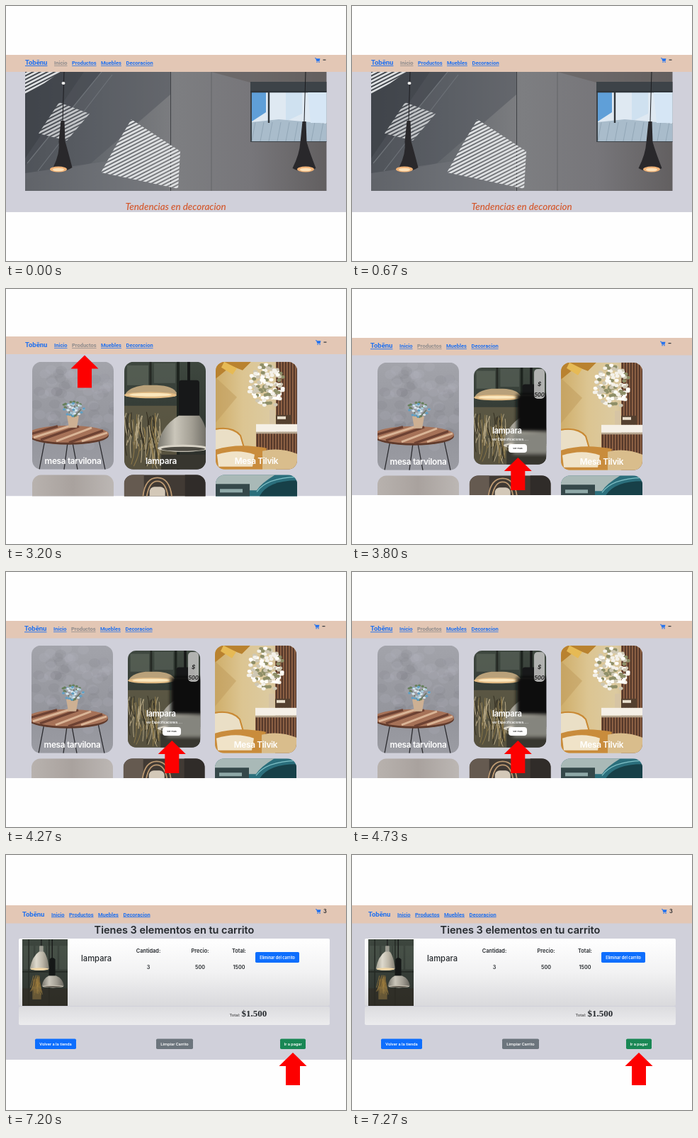
Write an HTML page that moves like this. It is 480x360 px and loops after 8 s.

```html
<!DOCTYPE html>
<html lang="es">
<head>
<meta charset="utf-8">
<title>Tienda</title>
<style>
html, body { margin: 0; width: 100%; height: 100%; overflow: hidden; background: #fefefe; }
svg { display: block; }
text { white-space: pre; }
.nav { font: 700 7.5px Roboto, sans-serif; fill: #1f70f0; text-decoration: underline; }
.ui { font-family: Inter, sans-serif; }
.rob { font-family: Roboto, sans-serif; }
.mono { font-family: "Liberation Mono", monospace; }
.title { font: 600 11.8px Inter, sans-serif; letter-spacing: -.3px; }
</style>
</head>
<body>
<script>
let seed = 7;
const rand = () => (seed = seed * 16807 % 2147483647) / 2147483647;
const range = (n, f) => Array.from({ length: n }, (_, i) => f(i)).join('');

const rect = (x, y, w, h, fill, more = '') =>
  `<rect x="${x}" y="${y}" width="${w}" height="${h}" fill="${fill}" ${more}/>`;
const path = (d, fill, more = '') => `<path d="${d}" fill="${fill}" ${more}/>`;
const line = (d, stroke, w = 1, more = '') => path(d, 'none', `stroke="${stroke}" stroke-width="${w}" ${more}`);
const oval = (x, y, rx, ry, fill, more = '') =>
  `<ellipse cx="${x}" cy="${y}" rx="${rx}" ry="${ry}" fill="${fill}" ${more}/>`;
const text = (x, y, s, size, fill, more = '', cls = 'ui') =>
  `<text x="${x}" y="${y}" font-size="${size}" fill="${fill}" class="${cls}" ${more}>${s}</text>`;
const mid = 'text-anchor="middle"';
const bold = 'font-weight="600"';
const at = (x, y, body, more = '') => `<g transform="translate(${x} ${y}) ${more}">${body}</g>`;
const grad = (id, dir, ...stops) => `<linearGradient id="${id}" ${dir === 'v' ? 'x2="0" y2="1"' : ''}>` +
  stops.map((c, i) => `<stop offset="${i / (stops.length - 1)}" stop-color="${c}"/>`).join('') + '</linearGradient>';
const blobs = (n, x, y, w, h, r, colors) => range(n, i => {
  const a = rand() * 6.283, d = Math.sqrt(rand());
  return oval(x + Math.cos(a) * d * w, y + Math.sin(a) * d * h, r, r * .8, colors[i % colors.length]);
});

const arrow = (x, y) => path(`M${x} ${y}l19.5 19h-9.5v27h-20v-27h-9.5z`, '#fd0000');

const cart = (x, y) => at(x, y,
  line('M0 .7h1.5l1.2 4h4', '#1f70f0', .9) + path('M1.8 1.2h5.7l-.9 3.1h-4z', '#1f70f0') +
  oval(3.1, 6.2, .8, .8, '#1f70f0') + oval(6, 6.2, .8, .8, '#1f70f0'));

const links = [['Inicio', 41], ['Productos', 66], ['Muebles', 107], ['Decoracion', 142.5]];

// Page background, top bar and links
function page({ top, bar, bottom, x, y, active, cartX, cartY, plain, count }, body) {
  return `<svg width="480" height="${bottom}">` +
    rect(0, top, 480, bottom - top, '#d0d0da') + rect(0, top, 480, bar - top, '#e3c7b5') +
    `<text x="${x}" y="${y}" class="nav" style="font-size:9.5px${plain ? ';text-decoration:none' : ''}">Tobēnu</text>` +
    links.map(([s, dx]) => `<text x="${x + dx}" y="${y}" class="nav" ${s === active ? 'style="fill:#8e8b8c"' : ''}>${s}</text>`).join('') +
    cart(cartX, cartY) +
    (count ? text(cartX + 11, cartY + 6, count, 7.5, '#212529', bold) : rect(cartX + 11.5, cartY + 2.5, 4, 1.2, '#34383c')) +
    body + '</svg>';
}

const hangLamp = (x, top, neck, half) =>
  line(`M${x + 2} 93L${x} ${top}`, '#1c1c1f', 1) +
  path(`M${x - 2.5} ${top}h5l1 29q4 14 ${half - 4} 37q-${half} 9-${half * 2 - 1} 0q10-20 ${half - 6}-37z`, '#29282b') +
  oval(x + neck, 230.5, 12, 4, '#f0b277') + oval(x + neck, 231, 8, 2.3, '#fbe0b8');

const hero = `<svg x="27" y="93" width="425.5" height="168" viewBox="27 93 425.5 168">` +
  rect(27, 93, 426, 168, 'url(#wall)') +
  path('M27 93H135L27 225z', '#3c4147', 'opacity=".75"') +
  path('M110 93H232V125L120 222L27 245V215z', '#52575d', 'opacity=".55"') +
  path('M27 236L150 218L232 261H27z', '#74777d', 'opacity=".5"') +
  path('M290 93H452V140L345 108z', '#64605e', 'opacity=".6"') +
  line('M135 93L30 222M150 97L45 233', '#6d7278', 1.2) +
  line('M232.5 93V261', '#3f4145', 1) + line('M290 93V261', '#5b5c60', .7) +
  path('M27 93H77L54 109L27 124z', 'url(#slats)') +
  path('M75 136L118 152L86 190L46 180z', 'url(#slats)', 'opacity=".8"') +
  path('M177 160L246 205L243 258L134 235L158 192z', 'url(#slats)') +
  rect(345, 107, 108, 85, '#3d4348') + rect(347, 121, 106, 70, '#dfe9f2') +
  path('M347 122H367V150L347 163z', '#5f9fd8') +
  path('M395 122H418V152L395 163z', '#cfe1f0') +
  path('M347 164L385 160L453 166V191H347z', '#a9bccb') +
  range(9, i => line(`M${352 + i * 12} 164l-5 27`, '#8197a8', .6)) +
  line('M371 120V165M345 121H453', '#30363b', 2.4) +
  path('M426 122H453V165H430z', '#d6e6f5') +
  hangLamp(80, 162, -6, 14) + hangLamp(421, 163, 2, 17) +
  oval(81, 109, 2.5, 2, '#f0f0ef') + '</svg>';

// Pictures of the product cards, each 115 x 152
const table = rect(0, 0, 115, 152, 'url(#concrete)') +
  blobs(70, 57, 62, 62, 62, 8, ['#b9bbc228', '#70747c20']) +
  line('M18 110L10 152M94 110L103 152M50 114L45 152M57 114L64 152', '#2b2b2f', 1.3) +
  oval(51, 104, 57, 13, '#5f3a2b') + oval(51, 102, 57, 12, '#a67258') +
  line('M-2 102L36 91M12 110L66 91M52 114L100 97', '#6d4233', 3.5) +
  line('M2 107L52 91M34 112L84 93M70 112L106 100', '#d9b496', 3) +
  path('M49 76H66L63 93H52z', '#cdb093') +
  line('M57 78L48 64M58 78L60 62M59 78L69 67', '#5e7156', 1.2) +
  blobs(40, 57, 67, 16, 11, 2, ['#d9e6ec', '#5f9fc4', '#66805b', '#a9c8d8']);

const lampCard = rect(0, 0, 115, 152, 'url(#dusk)') +
  rect(4, 5, 30, 28, '#667063', 'opacity=".55"') + rect(42, 2, 30, 28, '#5d675d', 'opacity=".55"') +
  rect(0, 62, 76, 90, '#6a6149', 'opacity=".7"') +
  line('M37 0V34', '#252924', 3) + line('M76 0V152', '#1e241f', 4) +
  path('M1 47Q5 36 28 33H46Q69 34 74 44L72 49H3z', '#b9a17a') +
  oval(37, 47, 37, 4.5, '#e4bd86') + oval(37, 46.5, 30, 2.4, '#fbe7bd') +
  range(60, () => { const x = rand() * 50, y = 70 + rand() * 50;
    return line(`M${x} ${y}q${rand() * 12 - 6} 12 ${rand() * 14 - 7} 32`, ['#b3a583', '#8b7749', '#332e21'][x * 9 % 3 | 0], 1.1); }) +
  rect(89, 0, 4, 30, '#171918') + rect(77, 26, 29, 56, '#171819', 'rx="4"') +
  path('M77 76H106Q118 92 120 122Q82 132 47 122Q50 92 77 76z', 'url(#enamel)') +
  oval(83, 122, 36, 5, '#d8d3c6') + oval(83, 123, 31, 3, '#4d4b43') + rect(52, 131, 63, 21, '#37362f');

const dressing = rect(0, 0, 115, 152, 'url(#cream)') +
  path('M0 0H50L38 12L22 6L0 24z', '#b9822f') + path('M12 0L30 9L24 18L8 8z', '#e6ba55') +
  path('M0 22L30 50L0 86z', '#bf9c5c', 'opacity=".5"') +
  rect(85, 0, 30, 152, '#8a5f43') + rect(57, 100, 58, 32, '#8a5f43') +
  range(15, i => rect(58 + i * 4, i < 7 ? 100 : 0, 1.6, i < 7 ? 32 : 132, '#4a3025')) +
  rect(76, 68, 8, 20, '#d6c4a4') + rect(85, 75, 22, 13, '#54402f') + rect(87, 77, 12, 4, '#e9dfcd') +
  blobs(130, 72, 35, 25, 32, 3, ['#f4f1e9', '#cfc8b4', '#fffdf8', '#8f8f68']) +
  rect(57, 88, 58, 11, '#f5f0e7') + rect(57, 99, 58, 2.5, '#b4a48e') +
  path('M0 96Q20 92 34 104L41 127L0 136z', '#eadfc6') + line('M0 95Q24 91 35 104L42 128', '#c98833', 2) +
  path('M0 124Q32 114 72 122L66 152H0z', '#c98c3c') +
  path('M2 131Q30 122 55 131L52 148H4z', '#f0e3c8') + path('M66 126Q90 120 115 130V152H66z', '#d9bd8c');

const plain = rect(0, 0, 115, 152, 'url(#stone)');
const swing = rect(0, 0, 115, 152, '#413a34') + rect(0, 0, 28, 40, '#655a50') + rect(86, 0, 29, 40, '#302c29') +
  line('M26 40Q27 4 47 4Q67 4 68 40M31 40Q33 9 47 9Q61 9 63 40', '#bd9a72', 1.8) +
  rect(36, 17, 22, 20, '#d3c8b8', 'rx="7"');
const salon = rect(0, 0, 115, 152, '#2b6f7c') + path('M0 0H84Q64 12 58 22H0z', '#a9b9b7') +
  path('M0 13H48V40H0z', '#35484a') + rect(6, 20, 32, 5, '#8fa9a8') +
  path('M62 30Q74 8 115 8V40H62z', '#174048') + line('M58 24Q72 4 115 3', '#7fc0c6', 1.3);

const card = (x, y, picture, label, more = '', lx = 57.5) =>
  at(x, y, `<g clip-path="url(#card)">${picture}</g>` +
    (label ? text(lx, 144.7, label, 11.8, '#fff', mid, 'title') : ''), more);

const rows = (x, y) => card(x, y, table, 'mesa tarvilona') + card(x + 259, y, dressing, 'Mesa Tilvik') +
  card(x, y + 159.5, plain) + card(x + 129.7, y + 159.5, swing) + card(x + 259, y + 159.5, salon);

const hovered = card(172, 111, lampCard +
    rect(68, 42, 60, 58, '#0d0f10', 'filter="url(#soft)"') +
    rect(62, 102, 60, 34, '#85857e', 'filter="url(#soft)"'), '', 'scale(.89 .9)') +
  rect(257, 113, 15, 42, '#c6c6c4', 'rx="5" opacity=".85"') +
  text(264.5, 137, '$', 8, '#1b1b1b', mid + ' font-style="italic" font-weight="600"') +
  text(264.5, 151.5, '500', 7.6, '#1b1b1b', mid + ' font-style="italic" font-weight="600"') +
  text(198, 204, 'lampara', 11.2, '#fff', 'style="font-size:11.2px"', 'title') +
  text(198, 213.8, 'ver Especificaciones.....', 4.4, '#fff', bold) +
  rect(221, 219, 26, 12, '#fff', 'rx="4"') + text(234, 226.4, 'ver mas', 3.5, '#333', mid + ' ' + bold);

// Two enamel lamps, used on the detail page and in the cart
const lamps = rect(0, -20, 125, 220, 'url(#dusk)') +
  range(4, i => rect(3 + i * 33, 4, 28, 60, '#5d675c', 'opacity=".35"')) +
  line('M18-20V200M74-20V200M0 70H125', '#252a25', 3) + rect(0, 112, 125, 90, '#302a22', 'opacity=".6"') +
  range(44, () => { const x = 30 + rand() * 18, y = 78 + rand() * 22;
    return line(`M${x} ${y}q${rand() * 8 - 4} 14 ${rand() * 18 - 9} 30`, rand() > .5 ? '#b08c45' : '#715a30', 1); }) +
  rect(28, 108, 24, 32, '#8c7440', 'opacity=".6"') +
  rect(51, -20, 3, 36, '#242624') + rect(47, 4, 11, 18, '#9c9b91', 'rx="2"') +
  path('M46 19H59Q69 27 74 63Q46 71 21 62Q27 31 46 19z', 'url(#shade)') +
  oval(47.5, 63, 25, 3.3, '#f0d6a5') +
  rect(81, -20, 3, 60, '#1b1d1c') + path('M75 38Q82 30 91 38V80H74z', '#151817') +
  path('M73 80H93Q111 86 115 106Q84 114 54 106Q57 87 73 80z', 'url(#enamel)') +
  oval(84.5, 107, 29, 3, '#c8c2b4') + oval(84.5, 107.6, 25, 1.7, '#5c574d');

const pill = (y, s) => rect(312, y, 38, 15, '#95e1d3', 'rx="7.5" filter="url(#drop)"') +
  text(331, y + 9.5, s, 5, '#d9f5ef', mid);

const detail = text(240.5, 126, 'Detalle de Producto', 14.6, '#2b2f33', mid + ' ' + bold) +
  rect(116, 153.5, 249, 160, '#fff', 'rx="3" filter="url(#drop)"') +
  `<svg x="116" y="153.5" width="125" height="138">${lamps}</svg>` +
  text(255, 178, 'lampara', 9.4, '#2b2f33', bold) + text(255, 204.5, '$500', 9, '#2b2f33', bold) +
  ['LAMPARA RETRO EN METAL CON LUZ DE 220', 'W72 NEGRO'].map((s, i) =>
    text(303.5, 217.5 + i * 4.5, s, 4, '#6b6b6b', mid + ' font-style="italic"', 'mono')).join('') +
  text(270, 266, '3', 10, '#e94a30', mid + ' font-weight="700"') +
  pill(255, '+') + pill(274, '-') +
  rect(253, 274, 38, 15, '#b09468', 'rx="7.5" filter="url(#drop)"') +
  text(272, 283, 'Añadir al carrito', 3.6, '#fff', mid + ' font-style="italic" font-weight="600"');

const button = (x, y, w, h, fill, s, size, cls) =>
  rect(x, y, w, h, fill, 'rx="1.8"') +
  text(x + w / 2, y + h / 2 + 2, s, size, '#fff', mid + (cls ? ' font-weight="500"' : ' ' + bold), cls);

const basket = text(237.5, 111, 'Tienes 3 elementos en tu carrito', 14.5, '#25292d', mid + ' ' + bold) +
  rect(18, 118, 439, 95, 'url(#panel)', 'rx="2"') +
  rect(18, 214, 439, 26, 'url(#foot)', 'rx="2"') +
  `<svg x="23" y="119" width="64" height="94">${at(0, 7, lamps, 'scale(.512 .556)')}</svg>` +
  text(106, 150, 'lampara', 11.2, '#25292d', 'font-weight="500"') +
  [['Cantidad:', 3, 201], ['Precio:', 500, 274], ['Total:', 1500, 329]].map(([head, value, x]) =>
    text(x, 138, head, 7.4, '#25292d', mid + ' ' + bold) + text(x, 161, value, 7.2, '#25292d', mid + ' ' + bold)).join('') +
  button(352, 137, 62, 15, '#0d6efd', 'Eliminar del carrito', 5.5) +
  text(315.5, 227.5, 'Total:', 6, '#333', '', 'rob') +
  text(332.5, 227.5, '$1.500', 13, '#25292d', 'font-weight="700" style="font-family:Liberation Serif,serif"') +
  button(41, 259.5, 58, 14.5, '#0d6efd', 'Volver a la tienda', 5.9, 'rob') +
  button(212, 259.5, 52, 14.5, '#6c757d', 'Limpiar Carrito', 5.9, 'rob') +
  button(387, 259.5, 36, 14.5, '#198754', 'Ir a pagar', 5.9, 'rob');

const scenes = [
  [0, page({ top: 69, bar: 93, bottom: 291, x: 27, y: 83, active: 'Inicio', cartX: 436, cartY: 73 },
    hero + text(239.5, 287.5, 'Tendencias en decoracion', 13.4, '#d4562a',
      mid + ' font-style="italic" font-weight="500" style="font-family:Lato,sans-serif"'))],
  [1800, page({ top: 67, bar: 92, bottom: 292.5, x: 27, y: 82, active: 'Productos', cartX: 437, cartY: 72, plain: true },
    rows(37, 102.8) + card(167, 102.8, lampCard, 'lampara', '', 52)) + arrow(111, 93.5)],
  [3600, page({ top: 69, bar: 93.5, bottom: 291, x: 26, y: 83.3, active: 'Productos', cartX: 435, cartY: 73.5 },
    rows(36, 103.8) + hovered) + arrow(234.3, 238)],
  [5400, page({ top: 69, bar: 94, bottom: 291, x: 28.5, y: 83.5, cartX: 438, cartY: 74 }, detail) + arrow(270.5, 290.5)],
  [7200, page({ top: 71, bar: 96.5, bottom: 289, x: 23, y: 86.5, cartX: 437, cartY: 76, plain: true, count: '3' }, basket) + arrow(405, 279)]
];

document.body.innerHTML = `<svg width="100%" height="100%" viewBox="0 0 480 360"><defs>
  ${grad('wall', 'h', '#4d5156', '#65696e', '#7d7e81', '#77767a', '#625f60')}
  ${grad('concrete', 'v', '#a3a4ab', '#9a9ba2', '#94959c', '#9b9ca3')}
  ${grad('dusk', 'v', '#3e473f', '#343b35', '#2b2d28')}
  ${grad('shade', 'h', '#a39f91', '#dedacd', '#bbb5a6', '#807d72')}
  ${grad('enamel', 'h', '#78766d', '#cac6ba', '#a29e93', '#66645d')}
  ${grad('cream', 'h', '#cfae6a', '#dcc592', '#dccaa0', '#c9b184')}
  ${grad('stone', 'h', '#b8b2ae', '#a9a29e', '#bcb7b4')}
  ${grad('panel', 'v', '#fff', '#f2f2f3', '#d9d9dc')}
  ${grad('foot', 'v', '#dcdcdf', '#ececee')}
  <pattern id="slats" width="8" height="4.6" patternUnits="userSpaceOnUse" patternTransform="rotate(-27)">
    <rect width="8" height="2.7" fill="#dfe1e3"/></pattern>
  <clipPath id="card"><rect width="115" height="152" rx="13"/></clipPath>
  <filter id="soft"><feGaussianBlur stdDeviation="3"/></filter>
  <filter id="drop" x="-20%" y="-20%" width="140%" height="150%">
    <feDropShadow dx="0" dy="1" stdDeviation="2" flood-opacity=".2"/></filter>
  </defs>
  ${scenes.map(s => `<g class="scene">${s[1]}</g>`).join('')}</svg>`;

const groups = [...document.querySelectorAll('.scene')];
function draw(now) {
  const t = now % 8000;
  const current = scenes.filter(s => s[0] <= t).length - 1;
  groups.forEach((g, i) => g.style.display = i === current ? '' : 'none');
  requestAnimationFrame(draw);
}
draw(0);
</script>
</body>
</html>
```
